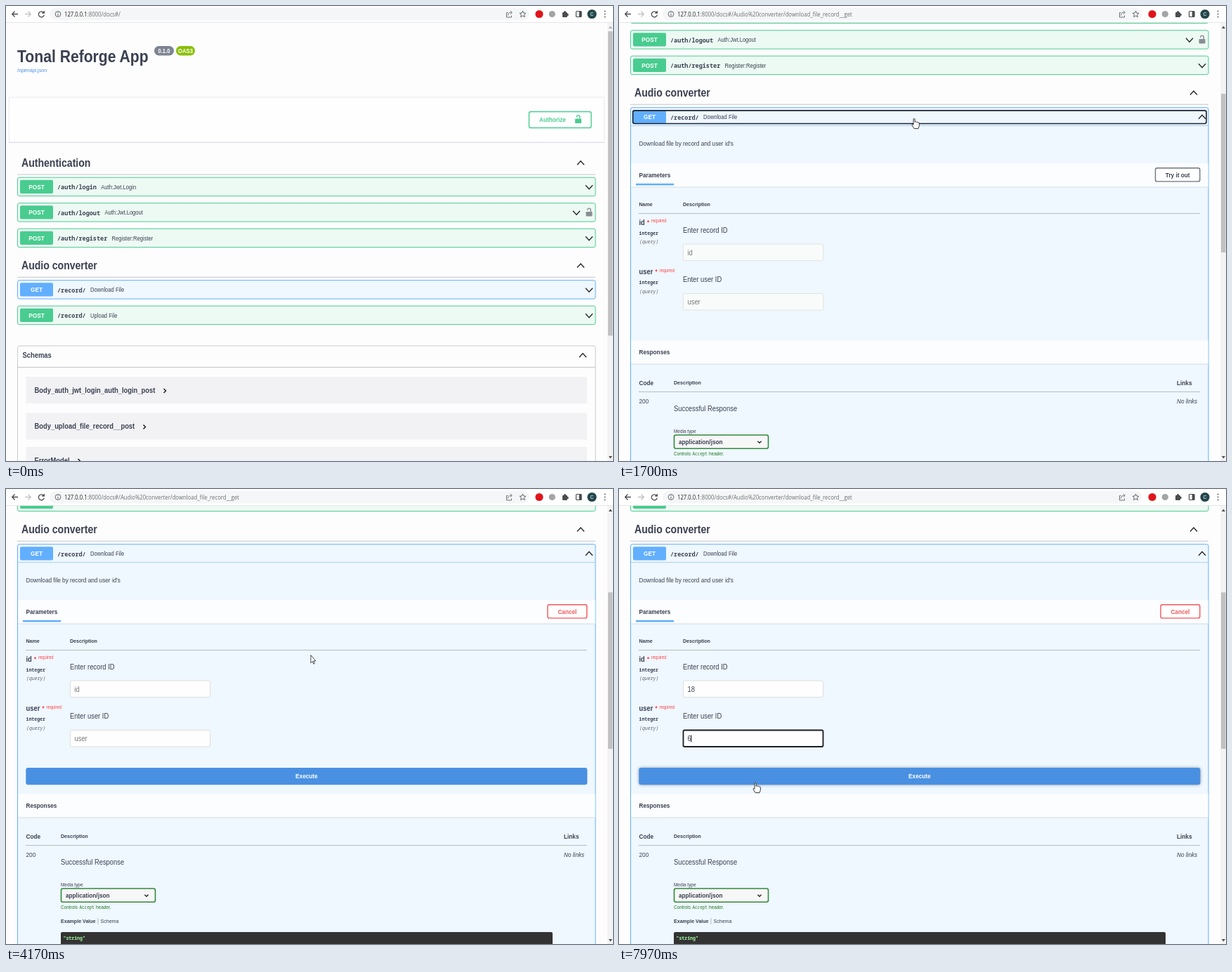
Recreate the animation shown at these times as an HTML page. Size 864 px wide and 648 px high, loop 8 s.

```html
<!DOCTYPE html>
<html lang="en">
<head>
<meta charset="utf-8">
<title>API docs</title>
<style>
  html, body { margin: 0; width: 100%; height: 100%; overflow: hidden; background: #fdfdfd; }
  svg { display: block; width: 864px; height: 648px; }
  text { font-family: "Liberation Sans", Arial, sans-serif; fill: #3b4151; white-space: pre; }
  .b { font-weight: bold; }
  .i { font-style: italic; }
  .m { font-family: "Noto Sans Mono", "DejaVu Sans Mono", monospace; }
  .url { font-family: "Open Sans", "Noto Sans", sans-serif; }
  .mid { text-anchor: middle; }
  .hover { filter: drop-shadow(0 0 2px rgba(0, 0, 0, .35)); }
</style>
</head>
<body>
<svg id="stage" viewBox="0 0 864 648"></svg>
<script>
const LOOP = 8000;
const SQUEEZE = 0.885; // the whole page is shown narrower than it was laid out
const GREEN = '#49cc90', BLUE = '#61affe', INK = '#3b4151', RED = '#f0595c';
const OPEN_AT = 1600, TRY_AT = 3780, ID_AT = 4500, USER_AT = 6570;

// Text is placed by its left (or middle) x and its vertical centre.
const text = (x, y, size, str, cls = '', fill = '') =>
  `<text transform="translate(${x} ${y + size * 0.36}) scale(${SQUEEZE} 1)" font-size="${size}" class="${cls}"${fill && ` style="fill:${fill}"`}>${str}</text>`;
const rect = (x, y, w, h, fill, stroke = 'none', r = 0, sw = 1, extra = '') =>
  `<rect x="${x}" y="${y}" width="${w}" height="${h}" rx="${r}" fill="${fill}" stroke="${stroke}" stroke-width="${sw}" ${extra}/>`;
const line = (d, stroke, sw = 1, extra = '') =>
  `<path d="${d}" fill="none" stroke="${stroke}" stroke-width="${sw}" ${extra}/>`;
const rule = (y, x1 = 16, x2 = 839, color = '#c4c6cb') => line(`M${x1} ${y}H${x2}`, color);
const dot = (x, y, r, fill, stroke = 'none') => `<circle cx="${x}" cy="${y}" r="${r}" fill="${fill}" stroke="${stroke}"/>`;
const group = (id, body) => `<g id="${id}">${body}</g>`;

const chevron = (x, y, up, w = 5, h = 5.5) => {
  const s = up ? -1 : 1;
  return line(`M${x - w} ${y - s * h / 2}L${x} ${y + s * h / 2}L${x + w} ${y - s * h / 2}`, '#222', 1.3);
};
const lock = (x, y, color) =>
  rect(x - 4.5, y - 1, 9, 6.5, color, 'none', 1) +
  line(`M${x - 2.3} ${y - 3}v-.6a2.3 2.3 0 0 1 4.6 0V${y - 1}`, color, 1.4);
const button = (id, x, y, w, h, label, color, fill = '#fff', ink = color) =>
  group(id, rect(x, y, w, h, fill, color, 2.5, 1.4) + text(x + w / 2, y + h / 2, 9.3, label, 'b mid', ink));

const section = (title, y) => text(22, y, 15.9, title, 'b') + chevron(818, y, true) + rule(y + 16.5);

function rowHead(method, y, path, note) {
  const color = method === 'GET' ? BLUE : GREEN;
  return rect(20, y - 9.8, 47, 19.4, color, 'none', 2) +
    text(43.5, y, 9.3, method, 'b mid', '#fff') +
    text(73, y + .3, 9.6, path, 'm b') +
    text(73 + path.length * 5.1 + 6.2, y, 8.6, note);
}
function row(method, y, path, note, locked) {
  const get = method === 'GET';
  return rect(16.5, y - 13.3, 822.5, 26.4, get ? '#eff7ff' : '#edfaf4', get ? BLUE : GREEN, 2.5) +
    rowHead(method, y, path, note) +
    chevron(locked ? 812 : 830, y + .5, false) +
    (locked ? lock(830, y, '#8a8d92') : '');
}

function schemas() {
  const models = [
    ['Body_auth_jwt_login_auth_login_post', 226], ['Body_upload_file_record__post', 197],
    ['ErrorModel', 104], ['HTTPValidationError', 145], ['UserCreate', 104], ['UserRead', 98], ['ValidationError', 121]
  ];
  return rect(16.5, 484, 822.5, 391, '#fdfdfd', '#c9cbd2', 2.5) +
    text(23.5, 497, 10.6, 'Schemas', 'b') + chevron(821, 497.5, true) + rule(514.5) +
    models.map(([name, x], i) => {
      const y = i ? 550 + 48.5 * i : 547;
      return rect(28.5, y - 19, 798.5, 38, '#f2f2f5') + text(40.5, y, 10.6, name, 'b') +
        line(`M${x - 1.5} ${y - 2}l3 3l-3 3`, '#222', 1.5);
    }).join('');
}

const panelHead = (y, title) =>
  rect(17, y, 821.5, 34, '#fcfdff') + rule(y + 34, 17, 838.5, '#d5dde6') + text(28.5, y + 17, 9.3, title, 'b');

function param(name, y, starX) {
  return text(28.5, y, 10.6, name, 'b') + text(starX, y - .5, 9, '*', 'b', '#ff3030') +
    text(starX + 6, y - 2, 6.6, 'required', '', '#ff4040') +
    text(28.5, y + 15, 7.4, 'integer', 'm b') + text(28.5, y + 27.5, 7.4, '(query)', 'm i', '#666') +
    text(91, y + 11, 10.6, `Enter ${name === 'id' ? 'record' : 'user'} ID`) +
    rect(91.5, y + 31, 199, 23.5, '#f9fbfb', '#e2e5dc', 2, 1, `id="${name}Box"`) +
    text(97.5, y + 43, 10.6, name, '', '#777').replace('<text', `<text id="${name}Text"`);
}

function responses() {
  return panelHead(722, 'Responses') +
    text(28.5, 782.5, 9.3, 'Code', 'b') + text(78, 782.5, 8, 'Description', 'b') + text(794, 782.5, 9.3, 'Links', 'b') +
    rule(795.5, 28, 827, '#b4bcc6') +
    text(28.5, 808.5, 9.3, '200') + text(78, 819.5, 10.6, 'Successful Response') + text(794, 808.5, 9.3, 'No links', 'i') +
    text(78, 851, 7.3, 'Media type') +
    rect(78.5, 857, 134, 19.2, '#f7f7f7', '#2f8a3c', 2.5, 1.6) + text(85, 866.5, 9.3, 'application/json', 'b') +
    chevron(200, 867, false, 2.6, 2.6) +
    text(78, 883.5, 7.3, 'Controls', '', '#1d7a1d') + text(104.5, 883.5, 6.7, 'Accept', 'm', '#1d7a1d') +
    text(128, 883.5, 7.3, 'header.', '', '#1d7a1d') +
    text(78, 903.5, 8, 'Example Value', 'b') + line('M131 899v9', '#bbb') + text(134.5, 903.5, 8, 'Schema') +
    rect(78, 919, 700, 120, '#333', 'none', 2) + text(81.5, 927.5, 7.4, '"string"', 'm b', '#a2fca2');
}

const closed = row('GET', 404, '/record/', 'Download File') + row('POST', 440.5, '/record/', 'Upload File') + schemas();

const opened = rect(16.5, 390.7, 822.5, 700, '#eff7ff', BLUE, 2.5) + rule(416.5, 17, 838.5, '#a9d2fb') +
  rowHead('GET', 404, '/record/', 'Download File') + chevron(830, 404, true) +
  text(28.5, 441.7, 9.3, "Download file by record and user id's") +
  panelHead(470, 'Parameters') + rect(24, 498.8, 54, 2.6, BLUE) +
  text(28.5, 528.5, 8, 'Name', 'b') + text(91, 528.5, 8, 'Description', 'b') + rule(541.5, 28, 827, '#b4bcc6') +
  param('id', 554, 40) + param('user', 624.5, 51.5) + group('responses', responses()) +
  group('idle', rect(19.7, 394.9, 816.3, 18.6, 'none', '#1c2230', 2.5, 1.6) +
    button('tryButton', 763.5, 476.7, 63.3, 19.2, 'Try it out', '#6f7480', '#fff', INK)) +
  group('trying', button('cancel', 771, 476.7, 55.8, 19.2, 'Cancel', RED) +
    button('execute', 29, 709.6, 797.7, 23, 'Execute', '#4990e2', '#4990e2', '#fff')) +
  line('M0 -5V5', '#111', 1, 'id="caret"');

const page = rect(0, 0, 857, 1200, '#fdfdfd') +
  text(16, 71, 23.9, 'Tonal Reforge App', 'b') +
  rect(211, 57, 28, 13.4, '#7d8492', 'none', 6.5) + text(225, 63.8, 8.7, '0.1.0', 'b mid', '#fff') +
  rect(242, 57, 27, 13.4, '#89bf04', 'none', 6.5) + text(255.5, 63.8, 8.7, 'OAS3', 'b mid', '#fff') +
  text(16, 91.5, 8, '/openapi.json', '', '#4990e2') +
  rect(4.5, 130, 847, 64.3, '#fefefe', '#e8e8f2') + rule(194.3, 4, 852, '#d9dae8') +
  button('authorize', 744.5, 150.5, 88.5, 23, '', GREEN) + text(759, 162, 9.3, 'Authorize', 'b', GREEN) + lock(814.5, 161.5, GREEN) +
  section('Authentication', 223.5) +
  row('POST', 257.5, '/auth/login', 'Auth:Jwt.Login') +
  row('POST', 294, '/auth/logout', 'Auth:Jwt.Logout', true) +
  row('POST', 330.5, '/auth/register', 'Register:Register') +
  section('Audio converter', 369.7) +
  group('closed', closed) + group('opened', opened);

const toolbar = rect(0, 0, 864, 24, '#fff') + rule(23.5, 0, 864, '#e4e6e8') +
  rect(62, 2.5, 683, 18, '#f5f6f7', 'none', 9) +
  line('M17 11.5H9M12.5 7.5L8.7 11.5L12.5 15.5', '#4a4d51', 1.3) +
  line('M27 11.5H35M31.5 7.5L35.3 11.5L31.5 15.5', '#c0c2c5', 1.3) +
  line('M53.6 9.4A4 4 0 1 0 54.3 12.6M54.3 7v3h-3', '#4a4d51', 1.3) +
  dot(74, 11.5, 3.9, 'none', '#5f6368') + line('M74 11v3M74 8.8v1.2', '#5f6368') +
  text(83, 11.5, 8.75, '127.0.0.1<tspan id="path" fill="#6b6f74" style="fill:#6b6f74"></tspan>', 'url', '#222') +
  line('M714.5 9.5h-2v6.5h7v-2.5M714.5 13.5c0-3 2-4.3 5-4.3M718 7l2.3 2.3L718 11.5', '#6b6f74') +
  line('M735.5 7l1.3 3 3.2.3-2.4 2.1.8 3.2-2.9-1.7-2.9 1.7.8-3.2-2.4-2.1 3.2-.3z', '#5f6368') +
  dot(759, 11.5, 5.6, '#e0161c') + dot(777.3, 11.5, 4.6, '#a2a4a6') +
  rect(792, 9, 7, 7, '#4a4d51', 'none', 1) + dot(795.5, 8.6, 1.6, '#4a4d51') + dot(799.2, 12.4, 1.6, '#4a4d51') +
  rect(811.5, 7.5, 7.5, 8, '#fff', '#4a4d51', 1, 1.2) + rect(815.7, 7.5, 3.5, 8, '#4a4d51') +
  dot(834, 11.5, 6.6, '#23474c') + text(834, 11.7, 7.5, 'C', 'mid', '#fff') +
  [7.5, 11.5, 15.5].map(y => dot(852.5, y, 1, '#5f6368')).join('');

const scrollbar = rect(856, 24, 8, 624, '#f3f3f3') + rect(857, 36, 6.5, 431, '#c1c1c1', 'none', 0, 1, 'id="thumb"') +
  '<path id="upArrow" d="M857.8 32l2.6-3.6l2.6 3.6z"/><path d="M857.8 641l2.6 3.6l2.6-3.6z" fill="#505050"/>';

const cursors =
  `<g id="arrow"><path d="M0 0V11.2L2.3 8.9L4 12.6L5.4 11.9L3.8 8.3H7z" fill="#fff" stroke="#222" stroke-width=".8"/></g>` +
  `<g id="hand"><path d="M-.9 1Q.2-.7 1.2 1V5.2Q2.4 4.2 3.3 5.3Q4.5 4.7 5.4 5.9Q7.4 5.4 7.4 7.6V10.6L6 14.6H.2L-3 9.6Q-3.2 7.6-.9 9z" fill="#fff" stroke="#222" stroke-width=".9"/></g>` +
  `<g id="beam">${line('M-2.3-7H-.6L0-6.3L.6-7H2.3M0-6.3V6.3M-2.3 7H-.6L0 6.3L.6 7H2.3', '#222')}</g>`;

const stage = document.getElementById('stage');
stage.innerHTML = group('page', page) + scrollbar + toolbar + group('cursor', cursors);
const $ = id => document.getElementById(id);
const show = (id, on) => $(id).setAttribute('display', on ? 'inline' : 'none');
const set = (id, attrs) => Object.entries(attrs).forEach(([k, v]) => $(id).setAttribute(k, v));

const ease = p => p < 0.5 ? 2 * p * p : 1 - 2 * (1 - p) ** 2;
const ramp = (t, a, b) => ease(Math.min(1, Math.max(0, (t - a) / (b - a))));

// time, x, y of the pointer's hot spot
const route = [
  [270, 492, 476], [800, 498, 459], [1000, 503, 401], [1450, 420, 160], [1700, 420, 160],
  [2630, 353, 292], [2970, 204, 263], [3120, 204, 263], [3640, 790, 176], [3880, 790, 176],
  [4430, 150, 285], [4900, 150, 285], [5550, 174, 303], [5800, 174, 303],
  [6430, 141, 347], [7430, 141, 347], [7900, 194, 418], [LOOP, 194, 418]
];
function pointer(t) {
  const i = Math.max(1, route.findIndex(k => k[0] > t));
  const [a, b] = [route[i - 1], route[i]];
  const p = ramp(t, a[0], b[0]);
  return [a[1] + (b[1] - a[1]) * p, a[2] + (b[2] - a[2]) * p];
}

function drawInput(name, value, enabled, focused) {
  set(name + 'Box', {
    fill: enabled ? '#fefefe' : '#f9fbfb',
    stroke: focused ? '#1a1d24' : enabled ? '#dcdfdc' : '#e2e5dc',
    'stroke-width': focused ? 1.8 : 1
  });
  $(name + 'Text').textContent = value || name;
  $(name + 'Text').style.fill = value ? INK : '#777';
}

function render(t) {
  const open = t >= OPEN_AT, trying = t >= TRY_AT;
  const scroll = 246 * ramp(t, 780, 1080) + 66 * ramp(t, 2700, 2950);
  const height = trying ? 1694 : open ? 1670 : 871;

  set('page', { transform: `translate(0 ${-scroll})` });
  set('thumb', { y: 36 + scroll * 604 / height, height: 625 * 604 / height });
  set('upArrow', { fill: scroll > 0 ? '#505050' : '#b0b0b0' });
  $('path').textContent = ':8000/docs#/' + (open ? 'Audio%20converter/download_file_record__get' : '');
  show('closed', !open);
  show('opened', open);
  show('idle', !trying);
  show('trying', trying);
  set('responses', { transform: `translate(0 ${trying ? 24 : 0})` });

  const idValue = t >= 5900 ? '18' : t >= 5600 ? '1' : '';
  const userValue = t >= 7450 ? '6' : '';
  const onUser = t >= USER_AT, onId = t >= ID_AT && !onUser;
  drawInput('id', idValue, trying, onId);
  drawInput('user', userValue, trying, onUser);
  const lastInput = [7450, USER_AT, 5900, 5600, ID_AT].find(at => t >= at);
  show('caret', lastInput && (t - lastInput) % 1060 < 530);
  const typed = (onUser ? userValue : idValue).length;
  set('caret', { transform: `translate(${97.7 + 5.2 * typed} ${onUser ? 667.5 : 597})` });

  const [x, y] = pointer(t);
  const py = y + scroll;
  const within = (x1, x2, y1, y2) => x > x1 && x < x2 && py > y1 && py < y2;
  const overButton = within(763, 827, 476, 496);
  const overExecute = trying && within(29, 827, 709, 733);
  const overRow = within(17, 839, 391, 417) || !open && within(17, 839, 427, 454);
  const overInput = trying && (within(91, 291, 585, 609) || within(91, 291, 655, 680));
  const shape = overInput ? 'beam' : overButton || overExecute || overRow ? 'hand' : 'arrow';
  show('cursor', t >= 270);
  set('cursor', { transform: `translate(${x} ${y})` });
  ['arrow', 'hand', 'beam'].forEach(id => show(id, id === shape));
  set('tryButton', { class: overButton ? 'hover' : '' });
  set('cancel', { class: overButton ? 'hover' : '' });
  set('execute', { class: overExecute ? 'hover' : '' });
}

const start = performance.now();
function tick() {
  render((performance.now() - start) % LOOP);
  requestAnimationFrame(tick);
}
tick();
</script>
</body>
</html>
```
